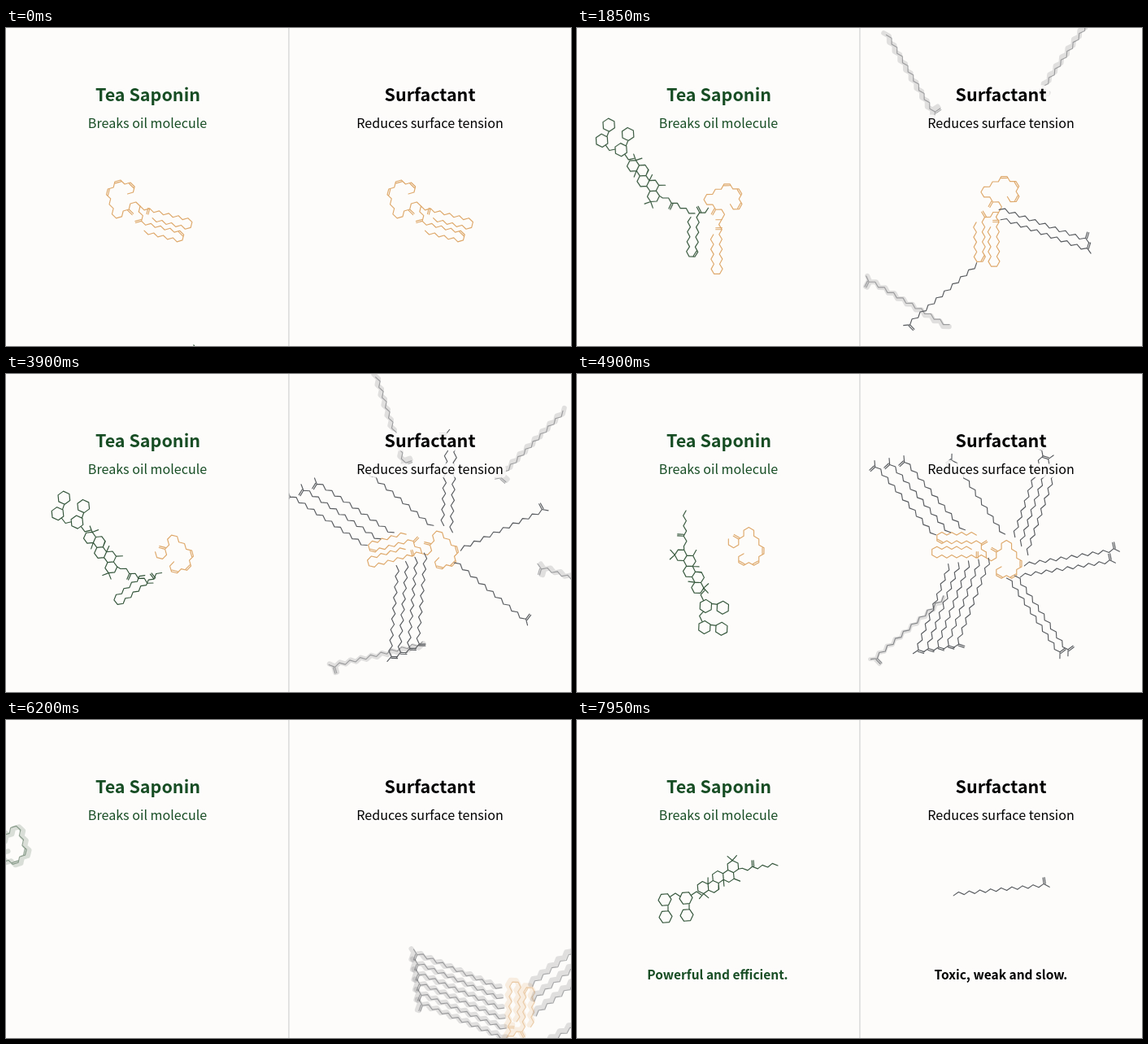
These frames come from a looping animation (695 by 391 pixels, 8 s). An HTML page:

```html
<!DOCTYPE html>
<html lang="en">
<head>
<meta charset="utf-8">
<title>Tea Saponin and Surfactant</title>
<style>
html, body { margin: 0; width: 100%; height: 100%; overflow: hidden; background: #fdfcfa; }
svg { display: block; }
#stage { width: 100vw; height: 100vh; }
path { fill: none; stroke-linecap: round; stroke-linejoin: round; }
text {
  font-family: "Noto Sans CJK JP", "Noto Sans CJK SC", "Noto Sans CJK", "Open Sans", sans-serif;
  text-anchor: middle; paint-order: stroke; stroke: #fdfcfa; stroke-width: 9px;
  stroke-opacity: .85; stroke-linejoin: round;
}
.title { font-size: 21.5px; font-weight: 700; }
.sub { font-size: 16.1px; }
.end { font-size: 15.5px; font-weight: 700; }
.tea { fill: #174d24; }
</style>
</head>
<body>
<svg id="stage" viewBox="0 0 695 391">
  <rect width="695" height="391" fill="#fdfcfa"/>
  <svg id="left" width="347" height="391" viewBox="0 0 347 391"></svg>
  <svg id="right" x="348" width="347" height="391" viewBox="348 0 347 391"></svg>
  <rect x="347.2" width="1.4" height="391" fill="#d8d8d7"/>
  <g class="tea">
    <text class="title" x="174.5" y="90">Tea Saponin</text>
    <text class="sub" x="174" y="123.4">Breaks oil molecule</text>
    <text class="end" x="173" y="319">Powerful and efficient.</text>
  </g>
  <text class="title" x="521.5" y="90">Surfactant</text>
  <text class="sub" x="521.5" y="123.4">Reduces surface tension</text>
  <text class="end" x="521.5" y="319">Toxic, weak and slow.</text>
</svg>
<script>
const LOOP = 8000, RAD = Math.PI / 180;
const ORANGE = [222, 168, 106], GREEN = [50, 84, 57], GREY = [88, 91, 95];
const mix = (a, b, k) => a + (b - a) * k;
const blend = (a, b, k) => a.map((v, i) => mix(v, b[i], k));
const clamp = k => Math.min(1, Math.max(0, k));
const polar = (r, a) => [r * Math.cos(a * RAD), r * Math.sin(a * RAD)];
const add = (p, q) => [p[0] + q[0], p[1] + q[1]];
const sub = (p, q) => [p[0] - q[0], p[1] - q[1]];
const turn = ([x, y], a) => {
  const [c, s] = polar(1, a);
  return [x * c - y * s, x * s + y * c];
};

// Bonds follow a honeycomb: each L or R turns the walk by 60 degrees
function walk(start, heading, turns, step) {
  const pts = [start, add(start, polar(step, heading))];
  for (const c of turns) {
    heading += c === 'L' ? -60 : 60;
    pts.push(add(pts.at(-1), polar(step, heading)));
  }
  return pts;
}
const poly = pts => 'M' + pts.map(p => p.map(v => v.toFixed(1)).join()).join('L');
const stub = (p, a, len = 8) => poly([p, add(p, polar(len, a))]);
function double(p, q) {
  const [dx, dy] = sub(q, p), n = turn(polar(2, Math.atan2(dy, dx) / RAD), 90);
  return poly([p, q]) + poly([add(p, n), add(q, n)]);
}
const carbonyl = (p, a) => double(p, add(p, polar(7.5, a)));
const hex = (c, r, a) => poly([0, 1, 2, 3, 4, 5].map(i => add(c, polar(r, a + i * 60)))) + 'Z';

// Oil: one curled and two hairpin chains that meet at the origin
const BOND = 7.2;
const curl = walk([0, 0], -136, 'LLRLRRRLRLRRLRRLRRR', BOND);
const HEAD = poly(curl) + stub([0, 0], 104, BOND) + carbonyl(curl[3], 44) +
  [11, 14, 17].map(i => double(curl[i], curl[i + 1])).join('');
const hairB = walk([0, 0], 44, 'LR'.repeat(5) + 'RR' + 'RL'.repeat(3) + 'R', 7);
const CHAIN_B = poly(hairB) + carbonyl(hairB[2], 104);
const hairC = walk([0, 0], 104, 'LRL' + 'LR'.repeat(4) + 'RR' + 'RL'.repeat(3) + 'R', 7);
const CHAIN_C = poly(hairC.slice(1)) + carbonyl(hairC[3], 164) + double(hairC[11], hairC[12]);

// Tea saponin: two sugar pairs, five fused rings and a tail ending at TIP
const TIP = [247, 179];
function teaPath() {
  let d = '';
  for (const i of [0, 1]) {
    const x = 108 + 26 * i, y = 221 - 2 * i;
    d += hex([x, y], 8, -5) + hex([x + 1, y + 21], 8, -5) + poly([[x + 4, y + 7], [x + 4, y + 14]]) +
      poly([[x + 7, y - 4], [x + 13, y - 8], [x + 19, y - 4]]);
  }
  const rings = walk([155, 206], -5, 'LRL', 13);
  const corner = (i, a) => add(rings[i], polar(7.5, a));
  d += rings.map(c => hex(c, 7.5, 25)).join('');
  for (const [i, a] of [[0, 85], [4, -95]]) d += stub(corner(i, a), a - 45) + stub(corner(i, a), a + 45);
  d += stub(corner(0, -35), -90) + stub(corner(1, -35), 90) + stub(corner(2, 25), 85) + stub(corner(3, 25), 22);
  const tail = walk(TIP, 201, 'LRLRLR', 7.2);
  return d + poly([...tail, corner(4, 25)]) + carbonyl(tail[5], -95);
}
const TEA = teaPath();

// Surfactant: free tail at the origin, head along +x
const rod = walk([0, 1.9], -30, 'RL'.repeat(8), 7.6);
const SURF = poly(rod) + carbonyl(rod.at(-1), -93) + stub(rod.at(-1), 35);

// Monotone cubic through rows of [time, ...values]
function track(keys) {
  const last = keys.length - 1;
  const slope = (i, c) => (keys[i + 1][c] - keys[i][c]) / (keys[i + 1][0] - keys[i][0]);
  const tangent = (i, c) => {
    if (i === 0) return slope(0, c);
    if (i === last) return slope(i - 1, c);
    const a = slope(i - 1, c), b = slope(i, c);
    return a * b > 0 ? 2 * a * b / (a + b) : 0;
  };
  return t => {
    if (t <= keys[0][0]) return keys[0].slice(1);
    if (t >= keys[last][0]) return keys[last].slice(1);
    const i = keys.findIndex(k => k[0] > t) - 1;
    const h = keys[i + 1][0] - keys[i][0], u = (t - keys[i][0]) / h, v = 1 - u;
    return keys[i].slice(1).map((a, j) =>
      a * (1 + 2 * u) * v * v + keys[i + 1][j + 1] * (3 - 2 * u) * u * u +
      h * u * v * (v * tangent(i, j + 1) - u * tangent(i + 1, j + 1)));
  };
}

// Poses are [x, y, angle]; both oils share one spin
const spin = track([[0, 0], [1850, 75], [2750, 107], [3900, 150], [4900, 166], [5800, 190], [6200, 258], [6700, 320]]);
const pathL = track([[0, 168, 225], [1850, 173, 240], [2750, 178, 241], [3900, 180, 222], [4900, 182, 205]]);
const pathR = track([[0, 513.5, 225], [2750, 514, 232], [3900, 506, 217], [4900, 499, 221],
  [5800, 502, 234], [6200, 622, 384], [6700, 790, 680]]);
const oilL = t => [...pathL(t), ...spin(t)];
const oilR = t => [...pathR(t), ...spin(t)];

const tea1 = track([[0, 231, 390, -80], [900, 148, 250, -15], [1500, 155, 246, 21], [1850, 145, 228, 38], [2450, -170, -90, 70]]);
const tea2 = track([[1700, -48, 560, 89], [2750, 105, 293, 53], [3500, 173, 243, 46], [3900, 181, 257, 36], [4500, -120, 130, 28]]);
const tea3 = track([[4250, 30, 520, -60], [4900, 134, 168, -99], [5500, 172, 206, -70], [5850, 166, 203, -69],
  [6200, -29, 141, -70], [6500, -260, 90, -72]]);

// A piece stays on the oil, then is carried off by a tea molecule
const carried = (tea, grab) => t => {
  if (t < grab) return oilL(t);
  const oil = oilL(grab), a = tea(grab), b = tea(t), d = b[2] - a[2];
  return [...add(b, turn(sub(oil, a), d)), oil[2] + d];
};

// Surfactants dock on the oil in parallel rows, placed as seen at REF
const REF = 4900, FLIGHT = 600;
const ROWS = [
  { n: 6, at: [508, 227], gap: [-12.4, 1.8], dir: 111, first: 900, every: 850 },
  { n: 3, at: [440, 199], gap: [18, -3], dir: 230, first: 1600, every: 650 },
  { n: 1, at: [525, 198], gap: [0, 0], dir: 236, first: 3350, every: 0 },
  { n: 3, at: [537, 200], gap: [8, 11], dir: -71, first: 3200, every: 650 },
  { n: 2, at: [550, 234], gap: [-5, 14], dir: -9, first: 2450, every: 2050 },
  { n: 2, at: [540, 247], gap: [-10, 3], dir: 56, first: 2450, every: 2050 }
];
function docking(row, i) {
  const ref = oilR(REF), dock = row.first + row.every * i;
  const offset = sub(add(row.at, row.gap.map(v => v * i)), ref);
  return t => {
    const oil = oilR(t), d = oil[2] - ref[2], dir = row.dir + d;
    const far = clamp((dock - t) / FLIGHT) ** 2 + Math.max(0, (dock - t) / FLIGHT - 1) * 2;
    const spot = add(oil, turn(offset, d));
    return [...add(spot, polar(225 * far, dir - 30)), dir + 160 * Math.min(1, far)];
  };
}

// Actors: a crisp line over a pale smear that grows with speed
const actors = [];
function actor(side, d, color, pose, local = '', fade = () => 1) {
  const make = () => {
    const p = document.createElementNS('http://www.w3.org/2000/svg', 'path');
    p.setAttribute('d', d);
    document.getElementById(side).append(p);
    return p;
  };
  actors.push({ smear: make(), line: make(), color, pose, local, fade });
}
const OIL = 'translate(-3 -6)';
const teaLocal = flip => `scale(1 ${flip}) rotate(16.8) translate(${-TIP[0]} ${-TIP[1]})`;
const tint = grab => t => blend(ORANGE, GREEN, clamp((t - grab + 100) / 250));
const fadeIn = t => clamp((t - 6850) / 600);
const drift = (centre, p, a) => t => {
  const d = (t - 7950) * .0025;
  return [...add(centre, turn(sub(p, centre), d)), a + d];
};
const orange = () => ORANGE, green = () => GREEN, grey = () => GREY;

actor('left', CHAIN_C, tint(1500), carried(tea1, 1500), OIL);
actor('left', CHAIN_B, tint(3500), carried(tea2, 3500), OIL);
actor('left', HEAD, tint(5650), carried(tea3, 5500), OIL);
actor('left', TEA, green, tea1, teaLocal(-1));
actor('left', TEA, green, tea2, teaLocal(-1));
actor('left', TEA, green, tea3, teaLocal(1));
actor('left', TEA, green, drift([173, 208], TIP, -16.8), teaLocal(1), fadeIn);
actor('right', HEAD + CHAIN_B + CHAIN_C, orange, oilR, OIL);
for (const row of ROWS)
  for (let i = 0; i < row.n; i++) actor('right', SURF, grey, docking(row, i));
actor('right', SURF, grey, drift([522, 209], [463, 214], -5.5), '', fadeIn);

const endings = document.querySelectorAll('.end');
function paint(el, pose, local, color, width, opacity) {
  const [x, y, a] = pose.map(v => v.toFixed(2));
  el.setAttribute('transform', `translate(${x} ${y}) rotate(${a}) ${local}`);
  el.setAttribute('stroke', color);
  el.setAttribute('stroke-width', width);
  el.setAttribute('opacity', opacity);
}

function render(t) {
  for (const { line, smear, color, pose, local, fade } of actors) {
    const now = pose(t), past = pose(Math.max(0, t - 25));
    const speed = Math.hypot(...sub(now, past)) + Math.abs(now[2] - past[2]) * .6;
    const blur = clamp((speed - 2) / 14), alpha = fade(t);
    const stroke = `rgb(${color(t).map(Math.round)})`;
    paint(line, now, local, stroke, 1.15, alpha * (1 - blur * .5));
    paint(smear, blend(now, past, .2), local, stroke, 2 + blur * 4, alpha * Math.min(.18, blur * .6));
  }
  endings.forEach(e => e.setAttribute('opacity', fadeIn(t)));
}

function tick() {
  render(performance.now() % LOOP);
  requestAnimationFrame(tick);
}
tick();
</script>
</body>
</html>
```
